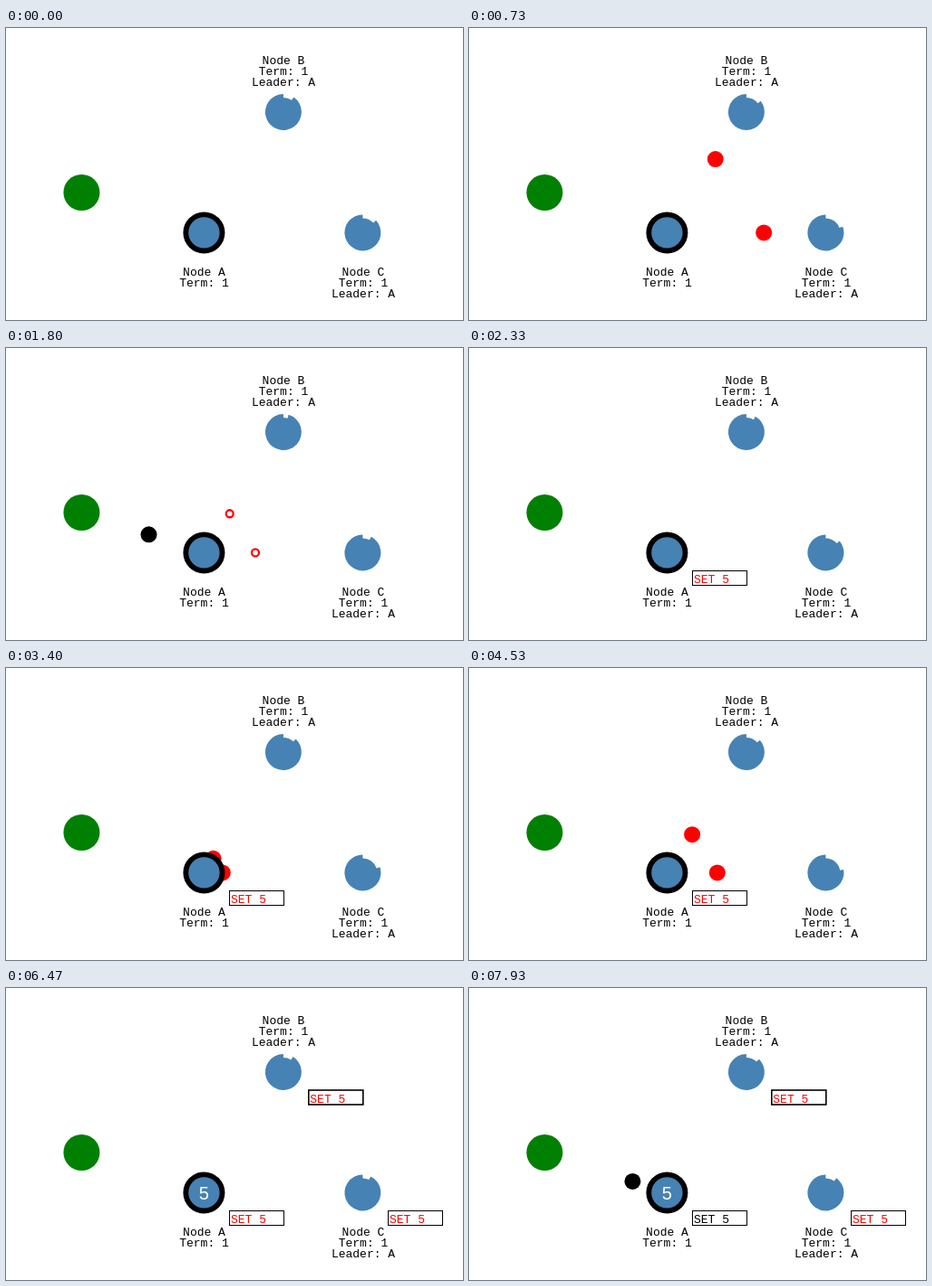
An HTML page that plays this animation: 504x323 px, repeating every 8000 ms.

```html
<!DOCTYPE html>
<html lang="en">
<head>
<meta charset="utf-8">
<title>Log replication</title>
<style>
  html, body { margin: 0; width: 100%; height: 100%; overflow: hidden; background: #fff; }
  svg { display: block; width: 504px; height: 323px; }
  text { font: 13px "Courier New", "Liberation Mono", monospace; white-space: pre; }
  .label { text-anchor: middle; }
  .value { font: 20px "Liberation Sans", Arial, sans-serif; fill: #fff; text-anchor: middle; }
</style>
</head>
<body>
<svg viewBox="0 0 504 323"></svg>
<script>
const LOOP = 8000, FPS = 15, TRIP = 15; // TRIP: ticks a message travels
const BLUE = "#4682b4";
const svg = document.querySelector("svg");

const P = {
  client: [83.4, 182],
  A: [218.4, 226.4],
  B: [305.9, 93],
  C: [393.4, 226.4]
};

function add(tag, attrs, text) {
  const el = document.createElementNS("http://www.w3.org/2000/svg", tag);
  for (const key in attrs) el.setAttribute(key, attrs[key]);
  if (text) el.textContent = text;
  svg.append(el);
  return el;
}

const show = (el, on) => el.setAttribute("visibility", on ? "visible" : "hidden");

// Messages lie below the nodes: from, to, start tick, kind
const LOOKS = {
  client: { r: 9, fill: "#000" },
  request: { r: 9, fill: "#f00" },
  reply: { r: 4, fill: "#fff", stroke: "#f00", "stroke-width": 2.3 }
};
const messages = [["client", "A", 18.77, "client"], ["A", "client", 78.2, "client"]];
for (const start of [1.85, 41.25]) {
  for (const peer of ["B", "C"]) {
    messages.push(["A", peer, start, "request"], [peer, "A", start + TRIP, "reply"]);
  }
}
const movers = messages.map(([from, to, start, kind]) =>
  ({ from: P[from], to: P[to], start, el: add("circle", LOOKS[kind]) }));

const disc = ([cx, cy], r, fill) => add("circle", { cx, cy, r, fill });
disc(P.client, 20, "green");
disc(P.A, 23, "#000");
disc(P.A, 17.2, BLUE);
const value = add("text", { class: "value", x: P.A[0], y: 234 }, "5");

function label(x, y, lines) {
  lines.forEach((line, i) => add("text", { class: "label", x, y: y + 12 * i }, line));
}
label(306, 40, ["Node B", "Term: 1", "Leader: A"]);
label(218.5, 274, ["Node A", "Term: 1"]);
label(394, 274, ["Node C", "Term: 1", "Leader: A"]);

function logEntry(x, y, weight, from) {
  const box = add("rect", { x, y, width: 60, height: 16, fill: "#fff", stroke: "#000", "stroke-width": weight });
  const text = add("text", { x: x + 1.5, y: y + 13.5 }, "SET 5");
  return { box, text, from };
}
const logs = [
  logEntry(246.5, 246.5, 1, 34),
  logEntry(333.8, 113, 1.6, 57),
  logEntry(421.5, 246.5, 1, 57)
];

// Election timers: [reset tick, degrees per tick]
const timers = [
  { at: P.B, runs: [[-22.5, 1.55], [16.85, 1.65], [56.25, 1.7]] },
  { at: P.C, runs: [[-22.5, 2.1], [16.85, 2.75], [56.25, 1.38]] }
];
for (const t of timers) {
  t.el = add("path", { fill: BLUE, transform: `translate(${t.at})` });
}

function dial(deg, inner = 16, outer = 20) {
  const a = deg * Math.PI / 180, s = Math.sin(a), c = -Math.cos(a);
  return `M0 ${-inner}A${inner} ${inner} 0 0 1 ${inner * s} ${inner * c}` +
    `L${outer * s} ${outer * c}A${outer} ${outer} 0 1 1 0 ${-outer}Z`;
}

// Frame count to simulation tick, with the pauses
function tickAt(frame) {
  if (frame < 44) return Math.min(frame, 35);
  if (frame < 68) return Math.min(frame - 8, 45);
  if (frame < 105) return Math.min(frame - 22, 78);
  if (frame < 119) return Math.min(frame - 26, 82);
  return 82.42;
}

function draw(ms) {
  const tick = tickAt(Math.floor((ms + 4) * FPS / 1000));
  for (const m of movers) {
    const p = (tick - m.start) / TRIP;
    show(m.el, p >= 0 && p < 1);
    m.el.setAttribute("cx", m.from[0] + (m.to[0] - m.from[0]) * p);
    m.el.setAttribute("cy", m.from[1] + (m.to[1] - m.from[1]) * p);
  }
  for (const t of timers) {
    const [reset, rate] = t.runs.filter(run => run[0] <= tick).pop();
    t.el.setAttribute("d", dial((tick - reset) * rate));
  }
  for (const l of logs) {
    show(l.box, tick >= l.from);
    show(l.text, tick >= l.from);
    l.text.setAttribute("fill", l === logs[0] && tick >= 76 ? "#000" : "#f00");
  }
  show(value, tick >= 75);
}

const begin = performance.now();
function loop() {
  draw((performance.now() - begin) % LOOP);
  requestAnimationFrame(loop);
}
loop();
</script>
</body>
</html>
```
